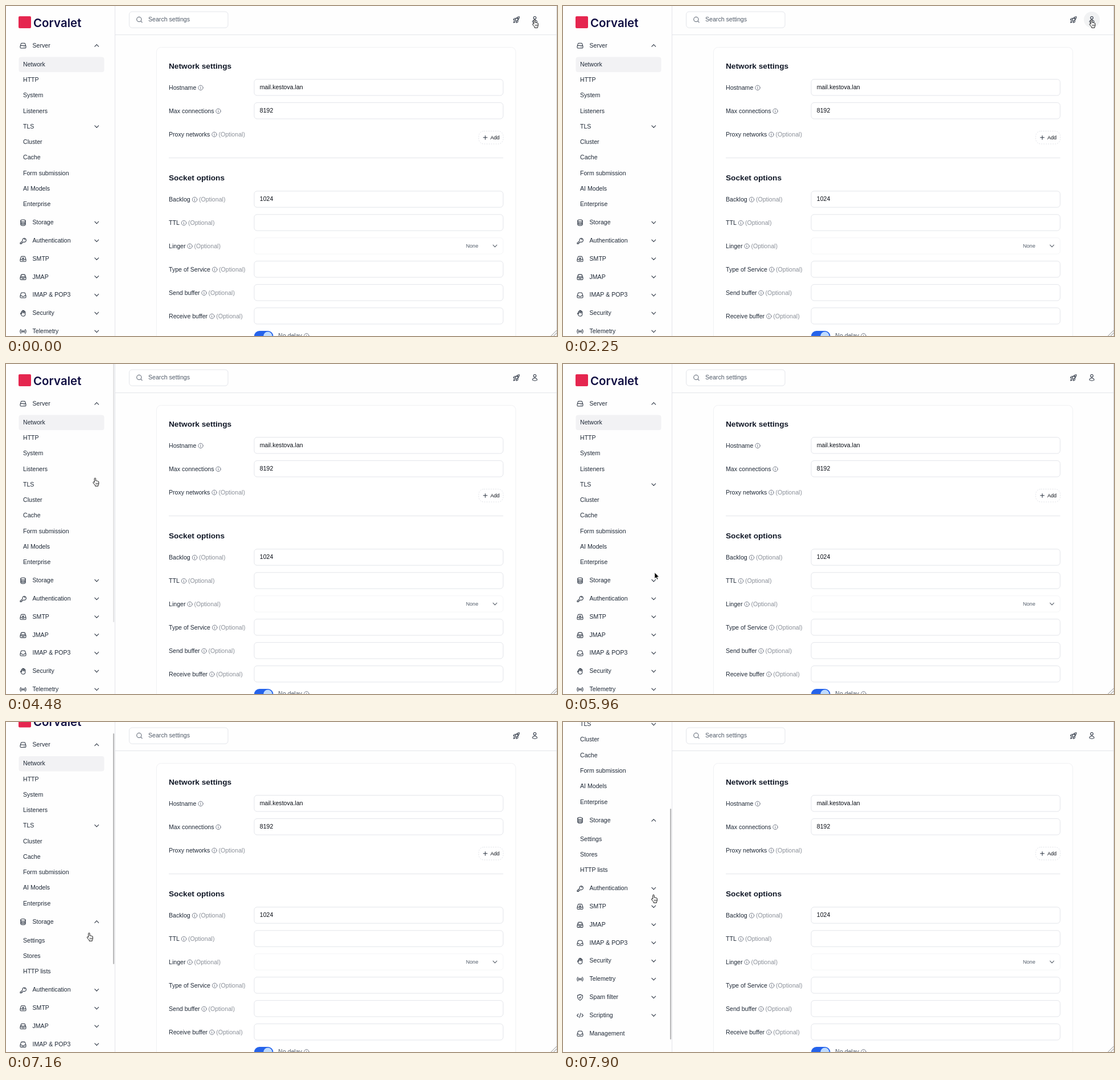
Recreate the animation shown at these times as an HTML page. Size 968 by 579 pixels, loop 8 s.

```html
<!DOCTYPE html>
<html lang="en">
<head>
<meta charset="utf-8">
<title>Network settings</title>
<style>
  html, body { margin: 0; width: 100%; height: 100%; overflow: hidden; background: #fefefe; }
  svg { display: block; width: 100%; height: 100%; }
  text { font: 10.6px "Liberation Sans", Arial, sans-serif; fill: #1f2937; white-space: pre; }
  .head { font-size: 13.68px; font-weight: 700; fill: #111827; }
  .brand { font: 600 20.5px Inter, sans-serif; fill: #100e42; }
  .small { font-size: 9.1px; }
  .muted { fill: #8b9099; }
  .value { fill: #0b0f17; }
  .hint { fill: #515b69; }
  .icon { fill: none; stroke: #2b3442; stroke-width: 1.05; stroke-linecap: round; stroke-linejoin: round; }
  .box { fill: #fff; stroke: #e3e5ea; }
  .line { stroke: #e3e5ea; fill: none; }
</style>
</head>
<body>
<svg id="stage" viewBox="0 0 968 579" preserveAspectRatio="none"></svg>
<script>
const LOOP = 8000;
const TICK = 148;

// Markup helpers
const text = (x, y, s, cls = "") => `<text x="${x}" y="${y}" class="${cls}">${s}</text>`;
const path = (d, cls = "icon", extra = "") => `<path d="${d}" class="${cls}" ${extra}/>`;
const rect = (x, y, w, h, r, extra = 'class="box"') =>
  `<rect x="${x}" y="${y}" width="${w}" height="${h}" rx="${r}" ${extra}/>`;
const circle = (x, y, r, extra = 'class="icon"') => `<circle cx="${x}" cy="${y}" r="${r}" ${extra}/>`;
const group = (id, body, extra = "") => `<g id="${id}" ${extra}>${body}</g>`;
const chevron = (x, y, up) => {
  const d = up ? -1.8 : 1.8;
  return path(`M${x - 3.4} ${y - d}L${x} ${y + d}L${x + 3.4} ${y - d}`, "icon", 'stroke-width="1.2"');
};

// Sidebar icons, centred on the origin
const tray = "M-5 1L-3.4-3.6Q-3.2-4.4-2.4-4.4H2.4Q3.2-4.4 3.4-3.6L5 1V3.4Q5 4.6 3.8 4.6H-3.8Q-5 4.6-5 3.4Z";
const inlet = "M-5 1H-2.2Q-1.6 2.6 0 2.6T2.2 1H5";
const icons = {
  server: path("M-5 1.4Q-5 0-3.6 0H3.6Q5 0 5 1.4V3Q5 4.4 3.6 4.4H-3.6Q-5 4.4-5 3ZM-5 1.2L-3.6-3.2Q-3.3-4.2-2.3-4.2H2.3Q3.3-4.2 3.6-3.2L5 1.2M1.4 2.2H1.5M3 2.2H3.1"),
  stack: '<ellipse cy="-3.2" rx="4.2" ry="1.9" class="icon"/>' +
    path("M-4.2-3.2V3.2Q-3.8 5.1 0 5.1T4.2 3.2V-3.2M-4.2-1Q-3.8.9 0 .9T4.2-1M-4.2 1.1Q-3.8 3 0 3T4.2 1.1"),
  key: path("M-.9.1A3.3 3.3 0 1 1 1 2L-.2 2.8H-1.6V4H-2.8V5.2H-5V3.6L-.9.1ZM2-3.1Q3.2-2.9 3.2-1.8"),
  inboxDown: path(tray + inlet + "M0-3V.6M-1.4-.8L0 .7L1.4-.8"),
  inboxStack: path(tray + inlet + "M-4.4-1.2H-1.8Q-1.4.3 0 .3T1.8-1.2H4.4"),
  inbox: path(tray + inlet),
  hand: path("M-2.6 1V-2.8Q-2.6-3.7-1.8-3.7T-1-2.8V-.6V-4.2Q-1-5-.2-5T.6-4.2V-.6V-3.7Q.7-4.5 1.4-4.5T2.2-3.7V-.2V-2.2Q2.3-3 3-3T3.8-2.2V1.4Q3.8 5.2.2 5.2Q-2.2 5.2-3.2 3L-4.4.6Q-4.6-.4-3.8-.5T-2.6 1"),
  signal: circle(0, 0, 1) + path("M-2-2.2Q-3.6 0-2 2.2M2-2.2Q3.6 0 2 2.2M-3.9-3.6Q-6.4 0-3.9 3.6M3.9-3.6Q6.4 0 3.9 3.6"),
  shield: path("M0-5Q2-3.4 4.4-3.4Q5.2 3 0 5.2Q-5.2 3-4.4-3.4Q-2-3.4 0-5ZM-1.7.3L-.4 1.6L1.8-1.3"),
  code: path("M-3-2.6L-5.4 0L-3 2.6M3-2.6L5.4 0L3 2.6M1-4L-1 4"),
};

// Each entry: level, label, icon, toggle state, submenu it belongs to
const nav = [
  [0, "Server", "server", "up"],
  ...["Network", "HTTP", "System", "Listeners"].map(s => [1, s]),
  [1, "TLS", null, "tls"],
  ...["ACME Providers", "Certificates", "Defaults"].map(s => [2, s, null, null, "tls"]),
  ...["Cluster", "Cache", "Form submission", "AI Models", "Enterprise"].map(s => [1, s]),
  [0, "Storage", "stack", "storage"],
  ...["Settings", "Stores", "HTTP lists"].map(s => [1, s, null, null, "storage"]),
  [0, "Authentication", "key", "down"],
  [0, "SMTP", "inboxDown", "down"],
  [0, "JMAP", "inboxStack", "down"],
  [0, "IMAP &amp; POP3", "inbox", "down"],
  [0, "Security", "hand", "down"],
  [0, "Telemetry", "signal", "down"],
  [0, "Spam filter", "shield", "down"],
  [0, "Scripting", "code", "down"],
  [0, "Management", "inbox"],
].map(([level, label, icon, toggle, parent]) => ({ level, label, icon, toggle, parent }));

function navMarkup(item) {
  let s = "";
  if (item.label === "Network") s += rect(22.5, -12.8, 150, 26.6, 4, 'fill="#f2f2f4"');
  if (item.icon) s += `<g transform="translate(30 .5)">${icons[item.icon]}</g>`;
  s += text([46.5, 30, 36][item.level], 3.6, item.label);
  if (item.toggle) {
    s += `<g class="up">${chevron(159.3, 0.4, true)}</g><g class="down">${chevron(159.3, 0.4, false)}</g>`;
  }
  return `<g class="nav">${s}</g>`;
}

const info = (x, y) => circle(x, y, 4.2, 'class="icon" style="stroke:#6b7280;stroke-width:.9"') +
  path(`M${x - .6} ${y - .3}H${x}V${y + 2}M${x} ${y - 2}V${y - 1.9}`, "icon", 'style="stroke:#6b7280;stroke-width:.9"');

// Form row: label, icon position, optional flag, input value
function row(y, label, infoX, optional, value) {
  let s = text(286, y + 3.8, label) + info(infoX, y + .4);
  if (optional) s += text(infoX + 7.4, y + 3.8, "(Optional)", "muted");
  if (value != null) s += rect(436, y - 14.4, 437.3, 28.4, 5) + text(445.8, y + 3.2, value, "value");
  return s;
}

const header =
  path("M192 50.5H967", "line") +
  rect(216.5, 10, 173.5, 28.2, 5) +
  circle(233.8, 23.4, 4.1, 'class="icon" style="stroke:#5b6472"') +
  path("M236.9 26.5L239.2 28.8", "icon", 'style="stroke:#5b6472"') +
  text(250, 27, "Search settings", "hint") +
  path("M894.6 24.6Q896.6 19.4 902 18.8Q901.6 24.4 896.6 26.6ZM895.6 21.6L892.6 22L891.4 24.4L894.2 24.6M899.4 25.2L899.2 28L896.8 29.4L896.4 26.8M893.4 26.2Q891.8 27 891.8 29.2Q893.8 29 894.8 27.6") +
  circle(899, 22, 1) +
  circle(929, 24, 14, 'id="hover" fill="#f1f2f3"') +
  circle(929, 20.8, 2.3) +
  path("M924.9 28Q925.2 24.8 929 24.8T933.1 28Q932 29.2 929 29.2T924.9 28Z");

const form =
  rect(264.5, 72.5, 631, 530, 8, 'fill="#fff" stroke="#f0f1f3"') +
  text(286, 109.6, "Network settings", "head") +
  row(143, "Hostname", 342, false, "mail.kestova.lan") +
  row(184, "Max connections", 373, false, "8192") +
  row(225, "Proxy networks", 366, true) +
  rect(830.5, 219.5, 43, 22.5, 9, 'fill="#fff" stroke="#e0e2e7" stroke-dasharray="2 2"') +
  path("M838.6 230.8H845.4M842 227.4V234.2") +
  text(851, 233.9, "Add", "small value") +
  path("M286 266.5H873.5", "line") +
  text(286, 305.7, "Socket options", "head") +
  row(339.2, "Backlog", 331.5, true, "1024") +
  row(380.2, "TTL", 312.5, true, "") +
  row(421, "Linger", 323, true) +
  rect(436, 406.7, 437.3, 28.4, 5, 'fill="none" stroke="#f4f5f7"') +
  text(808, 423.7, "None", "small hint") +
  `<g opacity=".8">${chevron(859, 421, false)}</g>` +
  row(462, "Type of Service", 366.7, true, "") +
  row(503, "Send buffer", 348, true, "") +
  row(544, "Receive buffer", 361.8, true, "") +
  rect(436, 570, 33.5, 18.4, 9.2, 'fill="#2563eb"') +
  circle(460, 579.2, 7.7, 'fill="#bfdbfe"') +
  text(478.3, 582.2, "No delay", "hint") +
  info(528, 578.8);

const menu =
  rect(813.5, 47, 140, 156, 7, 'fill="#111827" opacity=".04"') +
  rect(815.5, 46.5, 136.5, 152.5, 6, 'fill="#fff" stroke="#eceef1"') +
  path("M816 95V52Q816 47 821 47H946.5Q951.5 47 951.5 52V95Z", "", 'fill="#f3f4f6"') +
  text(828, 66.5, "Signed in as", "small hint") +
  text(828, 82, "admin") +
  ["Account", "Dark mode", "Logout"].map((s, i) => text(828, 119 + i * 27.3, s)).join("");

const pointer = path("M-1.2 6V1.3A1.2 1.2 0 0 1 1.2 1.3V5Q2.4 4.4 3.1 5.3Q4.3 4.8 4.9 5.8Q6.4 5.6 6.4 7.2V10Q6.4 11.6 5.4 12.8V14.2H.2V12.8Q-1.2 11.4-3.3 8.6Q-4 7.3-2.9 6.9Q-2 6.7-1.2 7.8Z", "", 'fill="#fff" stroke="#111" stroke-width="1"') +
  path("M1.4 8.6V11.4M3.1 8.6V11.4M4.7 8.6V11.4", "", 'stroke="#111" stroke-width=".7"');
const arrow = path("M0 0V11L2.6 8.7L4.3 12.5L6.1 11.7L4.5 8H8Z", "", 'fill="#000" stroke="#fff" stroke-width=".8"');

const stage = document.getElementById("stage");
stage.innerHTML =
  group("side",
    rect(22, 18, 22, 21, 2, 'fill="#e5264f"') +
    text(48, 36.6, "Corvalet", "brand") +
    nav.map(navMarkup).join("")) +
  rect(188, 0, 2.2, 405, 1.1, 'id="thumb"') +
  path("M191.5 0V579", "line") +
  header + form +
  path("M967.5 0V579", "", 'stroke="#cfcfd1"') +
  path("M957.5 579L967.5 569M962 579L967.5 573.5", "", 'stroke="#8a8a8a"') +
  group("menu", menu) +
  group("cursor", group("pointer", pointer) + group("arrow", arrow));

const $ = id => document.getElementById(id);
const show = (node, on) => node.setAttribute("display", on ? "inline" : "none");
const move = (node, x, y) => node.setAttribute("transform", `translate(${x} ${y})`);
const [side, thumb, hover, menuBox, cursor, hand, pick] =
  ["side", "thumb", "hover", "menu", "cursor", "pointer", "arrow"].map($);

[...document.querySelectorAll(".nav")].forEach((node, i) => {
  nav[i].node = node;
  nav[i].up = node.querySelector(".up");
  nav[i].down = node.querySelector(".down");
});

const smooth = p => p * p * (3 - 2 * p);
const lerp = (a, b, p) => a + (b - a) * p;

// Progress 0..1 in whole ticks
function progress(t, start, steps) {
  const k = Math.floor((t - start + 4) / TICK);
  return Math.min(1, Math.max(0, k / steps));
}

// Cursor legs: start, steps, tip position at the end, easing
const legs = [
  [2250, 5, 156.5, 212, smooth],
  [3730 - TICK, 1, 156.5, 200, smooth],
  [4480, 4, 160, 66, smooth],
  [5520 - TICK, 6, 161, 384, p => 1 - (1 - p) ** 2.6],
  [6560, 2, 146, 370, smooth],
  [7160, 5, 159, 303, smooth],
];

function cursorAt(t) {
  let x = 928.5, y = 24;
  for (const [start, steps, toX, toY, ease] of legs) {
    const p = ease(progress(t, start, steps));
    x = lerp(x, toX, p);
    y = lerp(y, toY, p);
  }
  return [x, y];
}

function layoutNav(open) {
  let y = 69, prev = null;
  for (const item of nav) {
    const visible = !item.parent || open[item.parent];
    show(item.node, visible);
    if (!visible) continue;
    if (prev) {
      if (item.level > prev.level) y += 33.2;
      else if (item.level === 0) y += prev.level ? 32 : 31.8;
      else y += 27.27;
    }
    move(item.node, 0, y);
    if (item.toggle) {
      const isUp = item.toggle === "up" || !!open[item.toggle];
      show(item.up, isUp);
      show(item.down, !isUp);
    }
    prev = item;
  }
}

function render(t) {
  const open = { tls: t >= 3590 && t < 4480, storage: t >= 6560 };
  layoutNav(open);

  const scrolling = t >= 7160;
  const p = progress(t, 7160, 5);
  const scroll = scrolling ? lerp(29.5, 207.7, 1 - (1 - p) ** 1.5) : 0;
  move(side, 0, -scroll);

  show(thumb, (t >= 3590 && t < 4180) || (t >= 4480 && t < 5070) || t >= 6560);
  thumb.setAttribute("y", -2 + scroll * 0.742);
  thumb.setAttribute("height", open.tls || open.storage ? 405 : 455);
  thumb.setAttribute("fill", scrolling ? "#b8b8ba" : "#e2e2e4");

  const [x, y] = cursorAt(t);
  const overPage = x > 190 && x < 915;
  const overGap = !open.storage && y > 361.5 && y < 367;
  move(cursor, x, y);
  show(pick, overPage || overGap);
  show(hand, !(overPage || overGap));

  show(menuBox, t >= 1050 && t < 2250);
  show(hover, t >= 1050 && x > 915);
}

const origin = performance.now();
function frame() {
  render((performance.now() - origin) % LOOP);
  requestAnimationFrame(frame);
}
frame();
</script>
</body>
</html>
```
